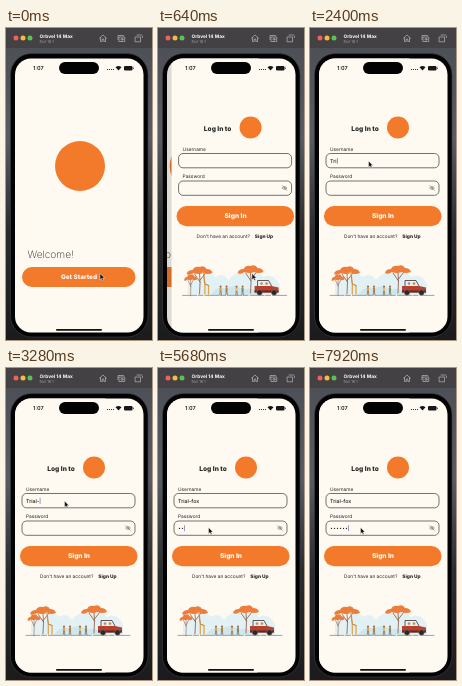
These frames come from a looping animation (146 by 312 pixels, 8 s). An HTML page:

```html
<!DOCTYPE html>
<html lang="en">
<head>
<meta charset="utf-8">
<title>Sign-in demo</title>
<style>
  html, body { margin: 0; width: 100%; height: 100%; overflow: hidden; background: #111; }
  svg { display: block; width: 100vw; height: 100vh; }
  text { font-family: Inter, "Open Sans", sans-serif; font-size: 4.8px; fill: #20201f; text-rendering: geometricPrecision; }
  .bold { font-weight: 800; }
  .mid { text-anchor: middle; }
  .light { fill: #fff; }
  .field { fill: #fefaf2; stroke: #3a3733; stroke-width: .7; }
  .orange { fill: #f37a2b; }
  .line { fill: none; stroke-linecap: round; stroke-linejoin: round; }
</style>
</head>
<body>
<svg viewBox="0 0 146 312" preserveAspectRatio="none">
  <defs>
    <clipPath id="screen"><rect x="9" y="30.5" width="128.5" height="274" rx="16"/></clipPath>
    <linearGradient id="desk" x2="0" y2="1">
      <stop offset="0" stop-color="#4b4d54"/>
      <stop offset=".35" stop-color="#5a5c64"/>
      <stop offset=".65" stop-color="#2b2c30"/>
      <stop offset="1" stop-color="#1b1b1d"/>
    </linearGradient>
    <g id="tree">
      <path class="line" d="M0 28Q1 16 0 7M.5 16L-5 8M.5 14L6 7" stroke="#8a5540" stroke-width=".8"/>
      <path d="M-13 8Q-12 4-7 4Q-5 0 0 1Q5-1 7 3Q12 3 13 7Q8 9 4 7Q-2 9-6 7Q-10 10-13 8Z" fill="#ee7c3b"/>
    </g>
    <g id="person">
      <circle cy="-8.2" r="1" fill="#8c5038"/>
      <path d="M-1.4-8.8h2.8L0-9.8Z" fill="#dca552"/>
      <rect x="-1.1" y="-7.2" width="2.2" height="3.8" rx=".8"/>
      <path class="line" d="M-.4-3.6L-.8 0M.4-3.6L.9 0" stroke="#665044" stroke-width=".6"/>
    </g>
  </defs>

  <rect width="146" height="312" fill="url(#desk)"/>
  <rect width="146" height="20" fill="#434143"/>
  <circle cx="10" cy="10" r="2.5" fill="#f0615a"/>
  <circle cx="17" cy="10" r="2.5" fill="#f2bd43"/>
  <circle cx="24" cy="10" r="2.5" fill="#58c454"/>
  <text class="light" x="33.5" y="9.8" font-weight="700">Orbvel 14 Max</text>
  <text x="33.5" y="15.3" style="font-size:4.1px;fill:#9b999b">Nol 16.1</text>
  <g class="line" stroke="#b9b7b9" stroke-width=".7">
    <path d="M93.5 10.2L97 7L100.5 10.2M94.5 9.5V13.5H96.2V11H97.8V13.5H99.5V9.5"/>
    <path d="M112 11.5V7.5H117.5M113.3 9H118.7V13.5H113.3Z"/>
    <path d="M129.5 9H134.5V13.8H129.5ZM131 7H135.5Q136.5 7 136.5 9.5"/>
    <circle cx="116" cy="11.3" r="1"/>
  </g>

  <rect x="4.5" y="25.5" width="137.5" height="283.5" rx="21" fill="#030303" stroke="#3b3a3b" stroke-width=".7"/>
  <g clip-path="url(#screen)">
    <g id="welcome">
      <rect x="9" y="30" width="129" height="275" fill="#fefaf2"/>
      <circle class="orange" cx="74" cy="138" r="25"/>
      <text x="21.5" y="229.8" style="font-size:10.2px;font-weight:200">Welcome!</text>
      <rect class="orange" x="16" y="239" width="113.5" height="20" rx="10"/>
      <text class="bold light mid" x="73" y="251.4" style="font-size:6.4px">Get Started</text>
    </g>
    <rect id="dim" x="9" y="30" width="129" height="275"/>
    <g id="login">
      <rect x="9" y="30" width="130" height="275" fill="#fefaf2"/>
      <text class="bold" x="41.3" y="102.5" style="font-size:6.6px">Log In to</text>
      <circle class="orange" cx="88" cy="99.5" r="11"/>
      <text x="20" y="122.7">Username</text>
      <rect class="field" x="16" y="125.5" width="113" height="14.3" rx="4.5"/>
      <text id="user" x="20" y="134.8" style="font-size:5.3px;font-weight:500"></text>
      <text x="20" y="150">Password</text>
      <rect class="field" x="16" y="153" width="113" height="14.3" rx="4.5"/>
      <g id="dots"></g>
      <g class="line" stroke="#6c6763" stroke-width=".5">
        <path d="M119.5 160Q122 156.8 124.5 160Q122 163.2 119.5 160M119.8 157.5L124.4 162.5"/>
        <circle cx="122" cy="160" r=".8"/>
      </g>
      <rect id="caret" width=".6" height="6" fill="#4d5f9e"/>
      <rect class="orange" x="14" y="178" width="117.5" height="20.3" rx="10"/>
      <text class="bold light mid" x="73" y="190.4" style="font-size:6.6px">Sign In</text>
      <text x="34" y="209.7">Don't have an account?</text>
      <text class="bold" x="92.3" y="209.7">Sign Up</text>

      <g id="safari">
        <path d="M25 267V256Q31 248 38 252Q44 240 53 249Q60 244 66 252Q74 241 84 246Q92 239 101 249Q110 244 117 256V267Z" fill="#e1f1f4"/>
        <path d="M48 267Q55 257 63 261Q72 255 81 262Q90 258 98 267Z" fill="#cfe6ec"/>
        <use href="#tree" transform="translate(28 246) scale(.5 .78)"/>
        <use href="#tree" x="37" y="233" transform="translate(0 5)"/>
        <use href="#tree" x="88" y="237"/>
        <path class="line" d="M39 245L41 244L42.3 256L46 257.5V266M42.3 257V266" stroke="#e0a64f" stroke-width="1.3"/>
        <path class="line" d="M41 247L42.3 256L46 257.5" stroke="#8d5334" stroke-width=".5" stroke-dasharray=".6 1.2"/>
        <use href="#person" x="58" y="267" fill="#d9a051"/>
        <use href="#person" x="64" y="267" fill="#b7824e"/>
        <use href="#person" x="74" y="267" fill="#e6ba72"/>
        <use href="#person" x="80" y="267" fill="#83906d"/>
        <path class="line" d="M20 267.4H125" stroke="#75604f" stroke-width=".6" stroke-dasharray="14 1.5 5 2"/>
        <path class="line" d="M95 258V252.5H106L109 258" stroke="#44302c" stroke-width=".8"/>
        <circle cx="99" cy="255.6" r="1.3" fill="#c88955"/>
        <circle cx="104" cy="255.6" r="1.3" fill="#c88955"/>
        <path d="M92 258H109L116 259.5V264.5H92Z" fill="#b8402f"/>
        <path d="M92 262.5H116V264.5H92Z" fill="#5b2b27"/>
        <g fill="#292728" stroke="#8b7a74" stroke-width=".5">
          <circle cx="97" cy="264.5" r="2.7"/><circle cx="111.5" cy="264.5" r="2.7"/>
        </g>
      </g>
    </g>

    <text x="27" y="42.4" style="font-size:5.5px;font-weight:600">1:07</text>
    <rect x="53" y="34" width="40" height="12" rx="6" fill="#020202"/>
    <g fill="#171717">
      <circle cx="101.5" cy="41.5" r=".6"/><circle cx="103.5" cy="41.5" r=".6"/>
      <circle cx="105.5" cy="41.5" r=".6"/><circle cx="107.5" cy="41.5" r=".6"/>
      <path d="M109.5 39.2Q112.5 36.7 115.5 39.2L112.5 42.5Z"/>
      <rect x="118" y="38" width="8.5" height="4.4" rx="1.2"/>
      <rect x="127" y="39.4" width=".7" height="1.6" rx=".3"/>
    </g>
    <rect x="50" y="301" width="46" height="1.7" rx=".85" fill="#111"/>
  </g>
  <path id="cursor" d="M0 0V6.2L1.5 4.9L2.5 7L3.6 6.5L2.6 4.5H4.5Z" fill="#111" stroke="#fff" stroke-width=".45"/>
</svg>

<script>
const LOOP = 8000;
const SCREEN_WIDTH = 129;
const USERNAME = "Trial-fox";
const $ = id => document.getElementById(id);
const clamp = (v, lo = 0, hi = 1) => Math.min(hi, Math.max(lo, v));
const ease = (t, from, to) => {
  const p = clamp((t - from) / (to - from));
  return p * p * (3 - 2 * p);
};
const typed = (t, start, step, count) => clamp(Math.floor((t - start) / step) + 1, 0, count);
const shift = (id, x, y = 0) => $(id).setAttribute("transform", `translate(${x} ${y})`);

const dots = Array.from({ length: 6 }, (_, i) => {
  const dot = document.createElementNS("http://www.w3.org/2000/svg", "circle");
  dot.setAttribute("cx", 21.5 + i * 3);
  dot.setAttribute("cy", 160.3);
  dot.setAttribute("r", .65);
  $("dots").append(dot);
  return dot;
});

// Critically damped spring, settled by about 800 ms.
function pushProgress(t) {
  const x = Math.max(0, t - 200) * .0117;
  return t >= 880 ? 1 : 1 - (1 + x) * Math.exp(-x);
}

function render(t) {
  const push = pushProgress(t);
  shift("welcome", -.3 * SCREEN_WIDTH * push);
  shift("login", SCREEN_WIDTH * (1 - push));
  $("dim").setAttribute("opacity", .13 * push);

  const toUser = ease(t, 800, 1280);
  const toPassword = ease(t, 4400, 4960);
  shift("cursor", 94 - 35.5 * toUser - 8 * toPassword, 245.5 - 112.5 * toUser + 26.5 * toPassword);

  const letters = typed(t, 1920, 240, USERNAME.length);
  $("user").textContent = USERNAME.slice(0, letters);
  const hidden = typed(t, 5280, 380, dots.length);
  dots.forEach((dot, i) => dot.setAttribute("visibility", i < hidden ? "visible" : "hidden"));

  const onPassword = t >= 5040;
  const textWidth = onPassword ? hidden * 3 : letters ? $("user").getComputedTextLength() : 0;
  $("caret").setAttribute("x", 20.4 + textWidth);
  $("caret").setAttribute("y", onPassword ? 157.2 : 129.9);
  $("caret").setAttribute("visibility", t >= 1520 ? "visible" : "hidden");
}

const start = performance.now();
function frame() {
  render((performance.now() - start) % LOOP);
  requestAnimationFrame(frame);
}
frame();
</script>
</body>
</html>
```
